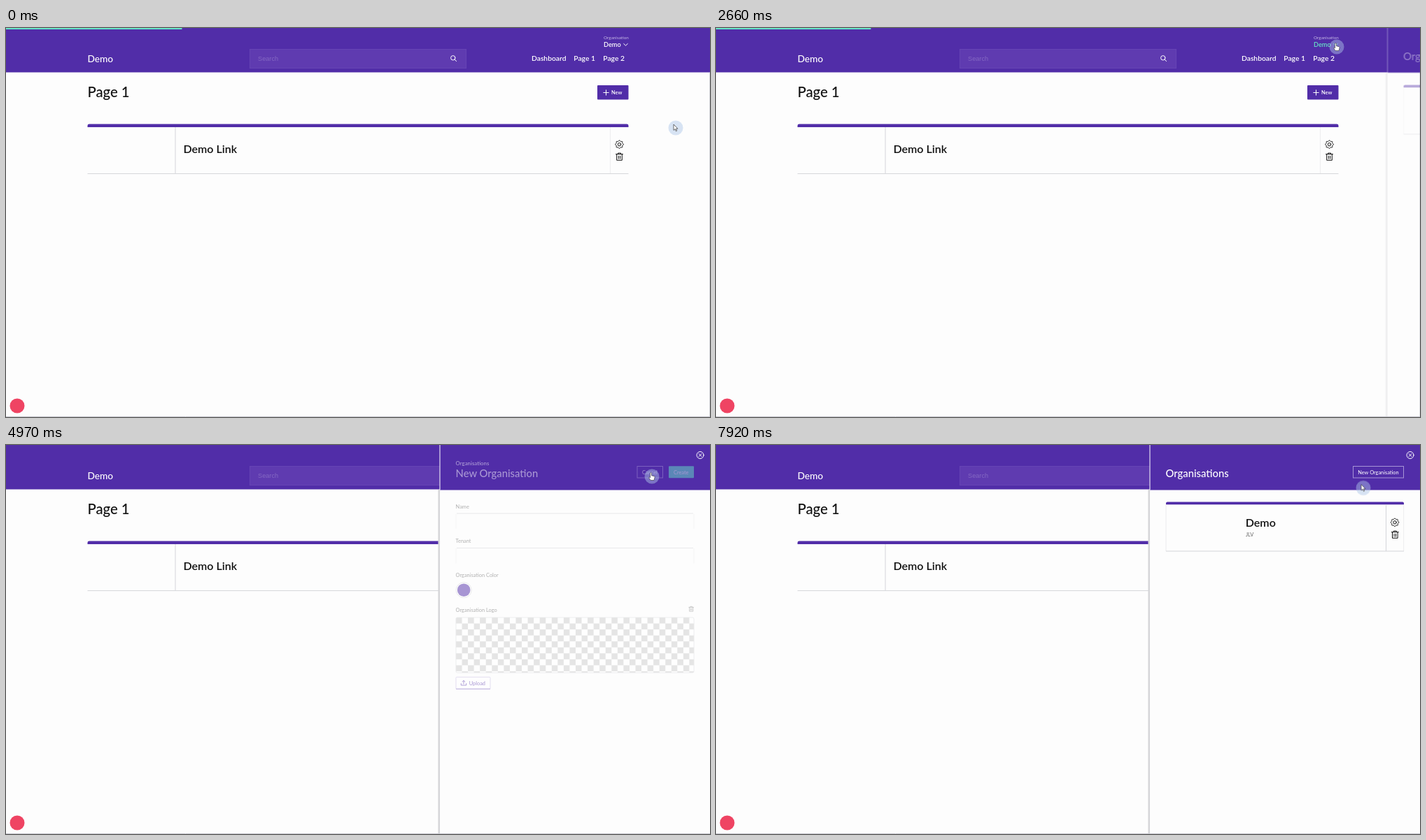
Write an HTML page that moves like this. It is 1006x557 px and loops after 8000 ms.

```html
<!DOCTYPE html>
<html lang="en">
<head>
<meta charset="utf-8">
<title>Organisation panel</title>
<style>
  html, body { margin: 0; width: 100%; height: 100%; overflow: hidden; background: #fdfdfd; }
  svg { display: block; width: 100vw; height: 100vh; }
  text { font-family: Lato, Carlito, sans-serif; fill: #111; }
  .h1 { font-size: 20.3px; font-weight: 500; }
  .h2 { font-size: 16px; font-weight: 600; }
  .title { font-size: 14.8px; font-weight: 500; }
  .nav { font-size: 10.3px; font-weight: 600; }
  .small { font-size: 7.4px; }
  .bold { font-weight: 600; }
  .label { fill: #666; }
  .white { fill: #fff; }
  .purple { fill: #512da8; }
  .teal { fill: #66e3c6; }
  .line { fill: none; stroke: #d4d5d9; }
  .faint { opacity: .4; }
  .edge { fill: none; stroke: #a794d6; }
  .icon { fill: none; stroke: #111; stroke-linecap: round; stroke-linejoin: round; }
  .light { stroke: #fff; }
  #org { font-size: 9.2px; fill: var(--tint); }
  #chevron { stroke: var(--tint); }
  #hand { opacity: var(--hand); }
  #arrow { opacity: calc(1 - var(--hand)); }

  /* One loop is 8 s, so 1% is 80 ms and one refresh is 1.5%. */
  svg, #cursor, #panel, #bar, #form, #list { animation: 8s linear -20ms infinite; }
  svg { --hand: 0; --tint: #fff; animation-name: hover; animation-timing-function: step-end; }
  #cursor { animation-name: point; }
  #panel { animation-name: slide, appear; }
  #bar { animation-name: load; }
  #form { animation-name: form; }
  #list { animation-name: list; }

  @keyframes hover {
    0%, 40.875%, 76%, 97.5%, 100% { --hand: 0; --tint: #fff; }
    24.125%, 48.375%, 88.25% { --hand: 1; --tint: #66e3c6; }
  }
  @keyframes point {
    0%, 3.125% { transform: translate(957px, 143px); animation-timing-function: steps(12); }
    21.125% { transform: translate(893px, 30px); animation-timing-function: steps(2); }
    24.125%, 37.875% { transform: translate(887px, 27px); animation-timing-function: steps(5); }
    46.875% { transform: translate(909px, 34px); animation-timing-function: steps(4); }
    52.875% { transform: translate(923px, 45px); animation-timing-function: step-end; }
    74.5% { transform: translate(925px, 48px); animation-timing-function: steps(3); }
    79%, 83.75% { transform: translate(925px, 73px); animation-timing-function: steps(3); }
    88.25%, 96% { transform: translate(923px, 44.5px); animation-timing-function: steps(2); }
    99%, 100% { transform: translate(925px, 61.5px); }
  }
  @keyframes slide {
    0%, 30.5% { transform: translateX(1010px); animation-timing-function: cubic-bezier(.32, 0, .67, 0); }
    36.5%, 100% { transform: translateX(620px); }
  }
  @keyframes appear {
    0%, 31.5% { opacity: 0; }
    36.5%, 100% { opacity: 1; }
  }
  @keyframes load {
    0% { transform: scaleX(.25); opacity: 1; animation-timing-function: step-end; }
    1.5% { transform: scaleX(.5); opacity: 1; animation-timing-function: step-end; }
    4.625% { transform: scaleX(0); opacity: 0; animation-timing-function: step-end; }
    31.75% { transform: scaleX(0); opacity: 1; animation-timing-function: steps(4); }
    37.75% { transform: scaleX(.88); opacity: 1; animation-timing-function: step-end; }
    39.375%, 100% { transform: scaleX(.88); opacity: 0; }
  }
  @keyframes form {
    0%, 60.625% { opacity: 0; animation-timing-function: steps(2); }
    63.625% { opacity: 1; animation-timing-function: step-end; }
    92.875%, 100% { opacity: 0; }
  }
  @keyframes list {
    0% { opacity: 1; animation-timing-function: step-end; }
    62.125%, 91.375% { opacity: 0; animation-timing-function: steps(2); }
    94.375%, 100% { opacity: 1; }
  }
</style>
</head>
<body>
<svg viewBox="0 0 1006 557" preserveAspectRatio="none">
  <defs>
    <g id="gear" class="icon">
      <circle r="2.2"/>
      <path id="cog"/>
    </g>
    <path id="trash" d="M-5-3.6H5M-2-3.8V-5.2H2V-3.8M-3.8-3.4V5H3.8V-3.4M-1.2-1V2.8M1.2-1V2.8"/>
    <pattern id="checks" x="643" y="247" width="17.1" height="17.1" patternUnits="userSpaceOnUse">
      <rect width="17.1" height="17.1" fill="#ccc"/>
      <path d="M8.55 0h8.55v8.55H0v8.55h8.55z" fill="#fff"/>
    </pattern>
  </defs>

  <rect width="1006" height="557" fill="#fdfdfd"/>
  <path class="line" d="M1005.5 64V557"/>

  <g id="page">
    <rect class="purple" width="1006" height="63.5"/>
    <text class="white" x="116.5" y="49" font-size="13.7" font-weight="500">Demo</text>
    <rect x="348.5" y="30.5" width="309" height="27" fill="#5f3bb0" stroke="#6644b4"/>
    <text x="360" y="47" style="font:9.2px 'Liberation Sans',Arial,sans-serif;fill:#8468c3">Search</text>
    <path class="icon light" d="M641.3 45.2L643.6 47.6M642 42.8a3.2 3.2 0 1 1-6.4 0a3.2 3.2 0 1 1 6.4 0"/>
    <text x="854" y="16" font-size="6.4" style="fill:#c3b5e4">Organisation</text>
    <text id="org" class="bold" x="854" y="26.6">Demo</text>
    <path id="chevron" class="icon" d="M882.7 22.5L885.5 25.2L888.3 22.5"/>
    <text class="nav white" x="751" y="47.3">Dashboard</text>
    <text class="nav white" x="811.3" y="47.3">Page 1</text>
    <text class="nav white" x="853.3" y="47.3">Page 2</text>

    <text class="h1" x="116.5" y="98.6">Page 1</text>
    <rect class="purple" x="845" y="82" width="44.5" height="20.4" rx="1"/>
    <path class="icon light" d="M853.8 92.5H861.2M857.5 88.8V96.2"/>
    <text class="small bold white" x="865" y="95.4">New</text>

    <path class="purple" d="M116.5 142V139.7Q116.5 137.6 119 137.6H887Q889.5 137.6 889.5 139.7V142z"/>
    <path class="line" d="M242 142V208.5M116.5 208.6H889.5"/>
    <path class="line faint" d="M863.5 142V208.5"/>
    <text class="h2" x="253.5" y="178.7">Demo Link</text>
    <use href="#gear" x="876.5" y="166.7"/>
    <use href="#trash" class="icon" x="876.5" y="184.3"/>
  </g>

  <circle cx="16" cy="541" r="10.5" fill="#ef4463"/>

  <g id="panel">
    <rect x="-2.5" y="64" width="2.5" height="493" fill="#d6d6d9"/>
    <rect width="386" height="557" fill="#fdfdfd"/>
    <rect class="purple" width="387" height="64.5"/>
    <path d="M0 0V64.5" stroke="#fff"/>
    <g transform="translate(-620 0)">
      <g class="icon light">
        <circle cx="992" cy="14.5" r="5"/>
        <path d="M990 12.5l4 4M994 12.5l-4 4"/>
      </g>

      <g id="list">
        <text class="title white" x="642.6" y="45.6">Organisations</text>
        <rect class="edge" x="910.5" y="30.5" width="72" height="16.5"/>
        <text class="small white" x="917.2" y="41.5">New Organisation</text>
        <path class="purple" d="M643 85.3V83.4Q643 81.6 645 81.6H981Q983 81.6 983 83.4V85.3z"/>
        <path class="line" d="M643 152H983M957.5 85.3V152"/>
        <path class="line faint" d="M643 85.3V152M982.7 85.3V152"/>
        <text class="h2" x="756.8" y="116.7">Demo</text>
        <text class="small label" x="757" y="131">JLV</text>
        <use href="#gear" x="970" y="110.8"/>
        <use href="#trash" class="icon" x="970.3" y="128.3"/>
      </g>

      <g id="form">
        <text class="bold white" x="642.6" y="28.6" font-size="7.8">Organisations</text>
        <text class="title white" x="642.6" y="45.6">New Organisation</text>
        <rect class="edge" x="902" y="30.5" width="36.5" height="16.5"/>
        <text class="small white" x="909" y="41.5">Cancel</text>
        <rect class="teal" x="947" y="30.3" width="36" height="17" rx="1"/>
        <text class="small white" x="954" y="41.5">Create</text>

        <text class="small label" x="642.6" y="90.5">Name</text>
        <text class="small label" x="642.6" y="139.8">Tenant</text>
        <path class="line" d="M644 98H982M644 147.5H982"/>
        <path class="line faint" d="M643 98.5V120M983 98.5V120M643 148V169.5M983 148V169.5"/>
        <text class="small label" x="642.6" y="189.2">Organisation Color</text>
        <circle class="line" cx="654.2" cy="207.7" r="11"/>
        <circle class="purple" cx="654.2" cy="207.7" r="9.3"/>
        <text class="small label" x="642.6" y="238.5">Organisation Logo</text>
        <use href="#trash" class="icon" style="stroke:#777" transform="translate(979.2 234.8) scale(.68)"/>
        <rect x="643" y="247" width="340" height="79" rx="2" fill="url(#checks)" stroke="#d4d5d9" stroke-width=".8"/>
        <rect x="643" y="332.3" width="49" height="17" rx="1" fill="#fff" stroke="#c9bfe4"/>
        <path d="M643 349.3H692" stroke="#7d64bf"/>
        <path class="icon" style="stroke:#512da8" stroke-width=".9"
          d="M650.3 341.5V344H657.7V341.5M654 342V337.3M652.2 339L654 337.2L655.8 339"/>
        <text class="small purple" style="fill:#512da8" x="661.8" y="343.6">Upload</text>
      </g>
    </g>
  </g>

  <path d="M0 556.5H1006" stroke="#c9c9d1"/>
  <rect id="bar" class="teal" width="1006" height="2"/>

  <g id="cursor">
    <circle r="10.5" fill="rgb(172,197,232)" fill-opacity=".47"/>
    <path id="arrow" d="M-3-5V3.4L-1 1.7L.4 4.8L1.7 4.2L.3 1.2H3z" fill="#fff" stroke="#333" stroke-width=".7"/>
    <path id="hand" d="M-2.4-4.8Q-1.4-5.8-.5-4.8V-1.2L3.2-.3Q4.2.2 4 1.5L3 5.5H-1.8L-4.6 1.5Q-4.3.4-2.4 1.8z"
      fill="#fff" stroke="#333" stroke-width=".6"/>
  </g>
</svg>

<script>
// Eight rounded teeth around the gear.
const points = Array.from({ length: 64 }, (_, i) => {
  const a = i * Math.PI / 32, r = 5.2 + .65 * Math.cos(8 * a);
  return [r * Math.cos(a), r * Math.sin(a)].map(v => v.toFixed(2)).join(' ');
});
document.getElementById('cog').setAttribute('d', `M${points.join('L')}z`);
</script>
</body>
</html>
```
